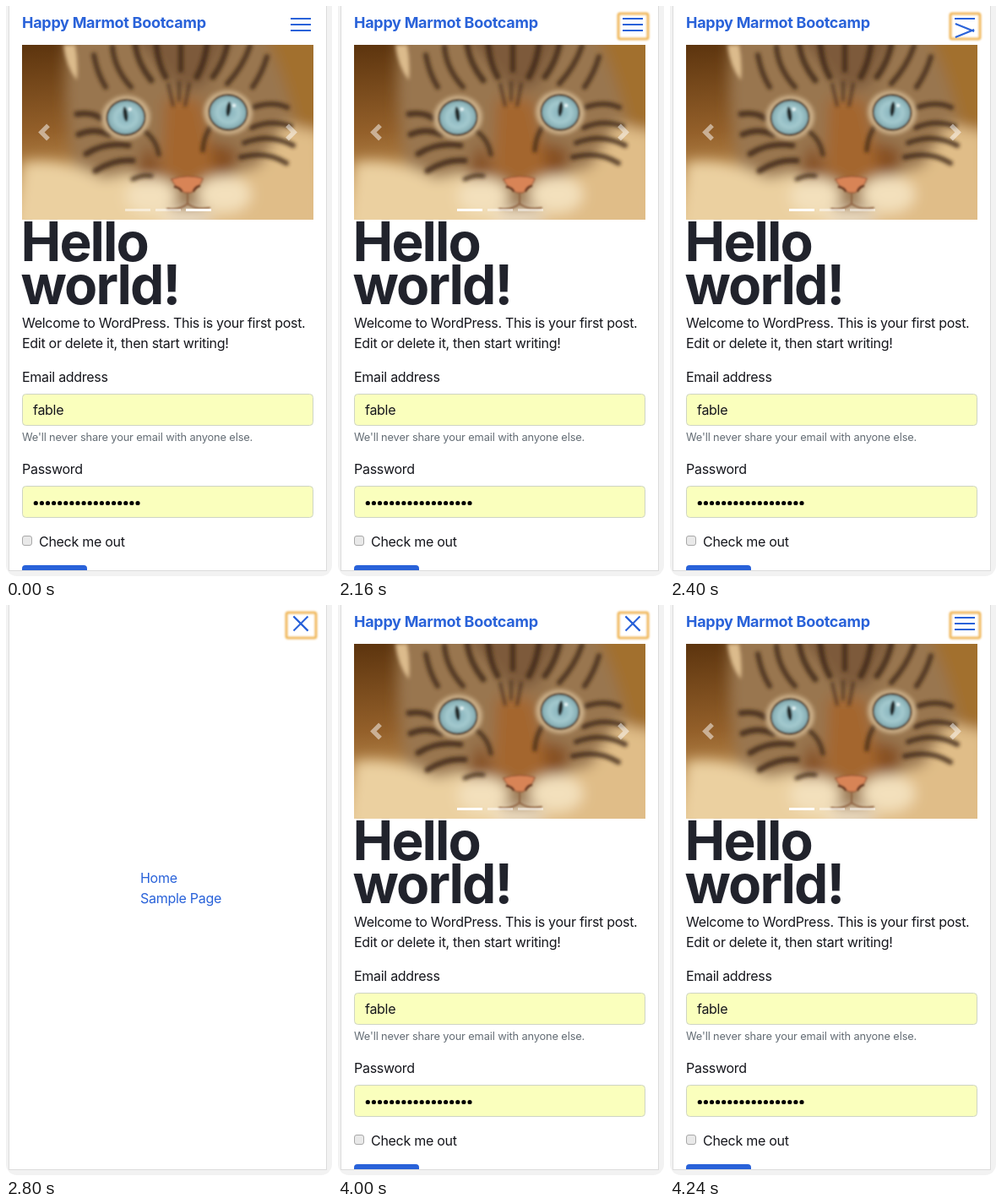
Recreate the animation shown at these times as an HTML page. Size 386x676 px, loop 5200 ms.

```html
<!DOCTYPE html>
<html lang="en">
<head>
<meta charset="utf-8">
<title>Mobile menu</title>
<style>
  html, body { margin: 0; width: 100%; height: 100%; overflow: hidden; background: #fff; }
  svg { display: block; }
  text { font: 16px Inter, "Liberation Sans", sans-serif; letter-spacing: -.018em; fill: #15161c; }
  .brand { font-size: 18px; font-weight: 700; letter-spacing: -.016em; fill: #2962d9; }
  .title { font-size: 64px; font-weight: 700; letter-spacing: -.03em; fill: #21232c; }
  .hint { font-size: 12.8px; letter-spacing: -.01em; fill: #636c74; }
  .link { fill: #2962d9; }
  .field { fill: #faffbd; stroke: #ced4c4; }
  .bar { stroke: #2962d9; stroke-width: 2; }
</style>
</head>
<body>
<svg width="386" height="676" viewBox="0 0 386 676">
  <defs>
    <filter id="soft" x="-30%" y="-30%" width="160%" height="160%"><feGaussianBlur stdDeviation="8"/></filter>
    <filter id="fur" x="-30%" y="-30%" width="160%" height="160%"><feGaussianBlur stdDeviation="2.2"/></filter>
    <filter id="fine" x="-30%" y="-30%" width="160%" height="160%"><feGaussianBlur stdDeviation=".8"/></filter>
    <linearGradient id="wall" x2=".12" y2="1">
      <stop offset="0" stop-color="#5c340e"/><stop offset=".5" stop-color="#94602a"/><stop offset="1" stop-color="#d9b070"/>
    </linearGradient>
    <radialGradient id="iris">
      <stop offset="0" stop-color="#83b0ba"/><stop offset=".6" stop-color="#a3c9ce"/><stop offset="1" stop-color="#82aab0"/>
    </radialGradient>
    <clipPath id="photo"><path d="M19 46h345v207H19z"/></clipPath>
    <g id="eye">
      <ellipse rx="29" ry="26" fill="#cbaf88" filter="url(#fur)"/>
      <ellipse rx="23.5" ry="22" fill="#4a3422"/>
      <ellipse rx="21.5" ry="19.5" fill="url(#iris)"/>
      <ellipse rx="2.8" ry="9" cy="-4" fill="#23292c"/>
      <circle cx="6" cy="-9" r="2" fill="#eef8fa"/>
    </g>
    <g id="cat" clip-path="url(#photo)">
      <path d="M19 46h345v207H19z" fill="url(#wall)"/>
      <g filter="url(#soft)">
        <path d="M290 30h90v140H300z" fill="#a2702f"/>
        <path d="M72 30Q66 110 78 175Q95 245 130 275H300Q350 235 346 160Q336 95 305 30z" fill="#997650"/>
        <path d="M19 185Q70 178 115 205L185 190 200 270H10z" fill="#ebd0a0"/>
        <path d="M330 140L375 150V270H235L250 205 300 190z" fill="#e0bd88"/>
        <path d="M145 30h125l-35 65-30 5z" fill="#7d5a3a"/>
        <path d="M188 110h42l18 85-32 18-32-18z" fill="#a4662d"/>
        <path d="M168 160l20 42-8 10-28-10zM242 160l6 45 22-10 4-25z" fill="#865024"/>
        <ellipse cx="172" cy="225" rx="30" ry="22" fill="#f3e0bc"/>
        <ellipse cx="258" cy="223" rx="32" ry="22" fill="#f3e0bc"/>
        <ellipse cx="214" cy="251" rx="32" ry="10" fill="#f3e3c8"/>
      </g>
      <path d="M68 46h14q4 22 2 42-13-16-16-42z" fill="#dcbb8c" filter="url(#fur)"/>
      <g filter="url(#fur)" fill="none" stroke="#3d2817" stroke-linecap="round" opacity=".8">
        <path stroke-width="7" d="M153 46q3 22 19 42M178 46q2 22 11 38M238 46q-3 22-12 38M262 46q-4 20-17 38"/>
        <path stroke-width="6" d="M126 48q2 26 22 48M289 47q-8 24-27 45M104 58q4 22 14 38M309 60q-5 18-17 36M207 46v30"/>
        <path stroke-width="7" d="M84 128q17-3 29 5M86 152q18-8 36 0M95 175q22-14 50-10M106 195q22-14 44-12"/>
        <path stroke-width="6" d="M293 120q22-8 40 0M291 144q22-10 46-2M282 162q30-12 58 3M278 179q30-8 54 7"/>
        <path stroke-width="5" d="M164 148q14 10 17 28M242 143q-8 12-9 28M150 205q12-6 22-4"/>
        <path stroke-width="3" d="M192 92l6 26M217 92l-5 26M205 90v22"/>
      </g>
      <use href="#eye" transform="translate(142 132) rotate(-8)" filter="url(#fine)"/>
      <use href="#eye" transform="translate(263 126) rotate(7)" filter="url(#fine)"/>
      <g filter="url(#fine)" fill="none" stroke-linecap="round">
        <path d="M196 205q18-6 37-1-3 11-14 17h-7q-12-6-16-16z" fill="#d88457" stroke="#8e4a2b"/>
        <path d="M200 214q6 1 8 5M229 213q-5 1-7 6" stroke="#5f301d" stroke-width="2.5"/>
        <path d="M215 222v12q-9 8-24 6M215 234q10 8 26 5" stroke="#8f6442" stroke-width="2"/>
      </g>
    </g>
  </defs>

  <rect y="-20" width="386" height="695" rx="13" fill="#f2f2f2"/>
  <rect x="3.5" y="-1" width="376" height="669.5" fill="#fff" stroke="#dcdcdc"/>

  <g id="page">
    <text class="brand" x="19" y="26">Happy Marmot Bootcamp</text>
    <g clip-path="url(#photo)">
      <g id="track"><use href="#cat"/><use href="#cat" x="345"/></g>
    </g>
    <g fill="#fff" fill-opacity=".5">
      <path id="chevron" d="M48.1 139.5l-10 10 10 10 3.8-3.8-6.3-6.2 6.3-6.2z"/>
      <use href="#chevron" transform="matrix(-1 0 0 1 383 0)"/>
    </g>
    <g id="dots" fill="#fff">
      <rect x="141" y="240" width="30" height="3"/>
      <rect x="177" y="240" width="30" height="3"/>
      <rect x="213" y="240" width="30" height="3"/>
    </g>
    <text class="title" x="17.5" y="302">Hello</text>
    <text class="title" x="17.5" y="353">world!</text>
    <text x="19" y="381">Welcome to WordPress. This is your first post.</text>
    <text x="19" y="405">Edit or delete it, then start writing!</text>
    <text x="19" y="445">Email address</text>
    <rect class="field" x="19.5" y="459.5" width="344" height="37" rx="4"/>
    <text x="32" y="484">fable</text>
    <text class="hint" x="19" y="515">We'll never share your email with anyone else.</text>
    <text x="19" y="554">Password</text>
    <rect class="field" x="19.5" y="568.5" width="344" height="37" rx="4"/>
    <path d="M35.3 588.5H157" stroke="#000" stroke-width="5.2" stroke-linecap="round" stroke-dasharray="0 7.1"/>
    <rect x="19.5" y="627.5" width="11" height="11" rx="2.5" fill="#e9e9e9" stroke="#a8a8a8"/>
    <text x="39" y="640">Check me out</text>
    <path d="M19 668v-2q0-4 4-4h69q4 0 4 4v2z" fill="#2962d9"/>
  </g>

  <g id="menu">
    <text class="link" x="159" y="329">Home</text>
    <text class="link" x="159" y="353">Sample Page</text>
  </g>

  <rect id="ring" x="332" y="9" width="35" height="30" rx="2" fill="none" stroke="#f0b85c" stroke-width="3" filter="url(#fine)"/>
  <g id="bars">
    <path class="bar" d="M-12 0h24"/>
    <path class="bar" d="M-12 0h24"/>
    <path class="bar" d="M-12 0h24"/>
  </g>
</svg>
<script>
const LOOP = 5200;
const el = id => document.getElementById(id);
const show = (id, on) => el(id).setAttribute("visibility", on ? "visible" : "hidden");

// Each pose lists [y, angle] for the three bars of the toggle.
const poses = {
  burger: [[15, 0], [22, 0], [29, 0]],
  turning: [[15, 0], [25.5, 22], [32.5, -22]],
  lowCross: [[15, 0], [29, 45], [36, -45]],
  cross: [[22, 45], [22, 45], [22, -45]]
};
const toggleSteps = [
  [0, "burger"], [2400, "turning"], [2480, "lowCross"], [2800, "cross"],
  [4080, "lowCross"], [4160, "turning"], [4240, "burger"]
];

function draw(now) {
  const t = now % LOOP;
  const pose = poses[toggleSteps.findLast(step => t >= step[0])[1]];
  [...el("bars").children].forEach((bar, i) => {
    const [y, angle] = pose[i];
    bar.setAttribute("transform", `translate(349 ${y}) rotate(${angle})`);
  });

  const sliding = t >= 1760 && t < 2160;
  el("track").setAttribute("transform", `translate(${sliding ? -162 : 0} 0)`);
  const active = t < 1760 ? 2 : 0;
  [...el("dots").children].forEach((dot, i) => dot.setAttribute("opacity", i === active ? 1 : .5));

  const open = t >= 2800 && t < 4000;
  show("page", !open);
  show("menu", open);
  show("ring", t >= 2160);
  requestAnimationFrame(() => draw(performance.now()));
}
draw(0);
</script>
</body>
</html>
```
